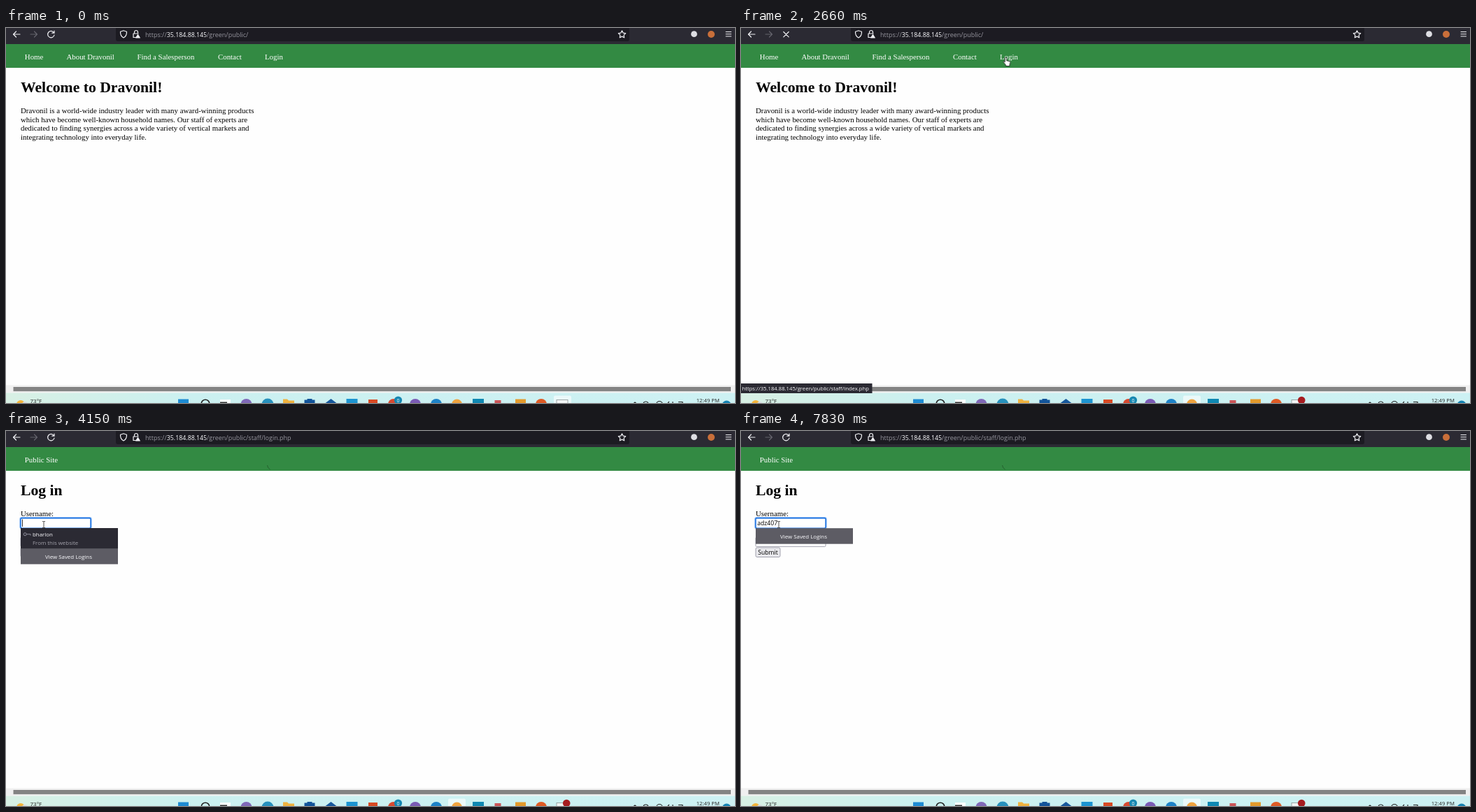
An HTML page that plays this animation: 1042 by 537 pixels, repeating every 8 s.

```html
<!DOCTYPE html>
<html lang="en">
<head>
<meta charset="utf-8">
<title>Login walkthrough</title>
<style>
html, body { margin: 0; width: 100%; height: 100%; overflow: hidden; background: #fff; }
svg { display: block; width: 1042px; height: 537px; }
text { white-space: pre; }
.page { font: 10.85px "Liberation Serif", Times, serif; }
.page .h1 { font-size: 21.7px; font-weight: bold; }
.nav { fill: #fff; }
.ui { font-family: "Open Sans", "Noto Sans", sans-serif; }
.url { font-size: 9px; fill: #96959e; }
.url .host { fill: #fbfbfe; }
.line { fill: none; stroke: #f0f0f4; stroke-width: 1.2; stroke-linecap: round; stroke-linejoin: round; }
.field { fill: #fff; stroke: #8f8f9d; stroke-width: .8; }
.glow { fill: none; stroke: #9cc4f7; stroke-width: 2.6; }
.focus { fill: #fff; stroke: #0a66dd; stroke-width: 1.4; }
.menu { font-size: 7.9px; fill: #fbfbfe; }
.form { font-size: 8.6px; }

/* One 8 s timeline, 1% = 80 ms */
.home, .login, .reload, .stop, .status, .app1, .app2, .rec, .arrow, .hand, .beam,
.pass, .user, .full, .short, .caret, .typed { animation: 8s step-end infinite; }
.home { animation-name: home; }
.login { animation-name: login; }
.reload { animation-name: reload; }
.stop { animation-name: stop; }
.status { animation-name: status; }
.app1 { animation-name: app1; }
.app2 { animation-name: app2; }
.rec { animation-name: rec; }
.arrow { animation-name: arrow; }
.hand { animation-name: hand; }
.beam { animation-name: beam; }
.pass { animation-name: pass; }
.user { animation-name: user; }
.full { animation-name: full; }
.short { animation-name: short; }
.caret { animation-name: type, blink; }
.typed { animation-name: type; }
.pointer { animation: move 8s linear infinite; }

@keyframes home { 0% { visibility: visible } 36.625% { visibility: hidden } }
@keyframes login { 0% { visibility: hidden } 36.625% { visibility: visible } }
@keyframes reload { 0%, 36.625% { visibility: visible } 29% { visibility: hidden } }
@keyframes stop { 0%, 36.625% { visibility: hidden } 29% { visibility: visible } }
@keyframes status { 0%, 36.625% { visibility: hidden } 24% { visibility: visible } }
@keyframes app1 { 0% { visibility: visible } 28.125% { visibility: hidden } }
@keyframes app2 { 0% { visibility: hidden } 28.125% { visibility: visible } }
@keyframes rec { 0% { visibility: hidden } 1.75% { visibility: visible } }
@keyframes arrow { 0%, 21.5%, 49.25% { visibility: hidden } .875%, 40% { visibility: visible } }
@keyframes hand { 0%, 36.625% { visibility: hidden } 21.5% { visibility: visible } }
@keyframes beam { 0% { visibility: hidden } 49.25% { visibility: visible } }
@keyframes pass { 0%, 51% { visibility: hidden } 36.625% { visibility: visible } }
@keyframes user { 0% { visibility: hidden } 51% { visibility: visible } }
@keyframes full { 0%, 74.5% { visibility: hidden } 51.875% { visibility: visible } }
@keyframes short { 0% { visibility: hidden } 74.5% { visibility: visible } }
@keyframes blink {
  0%, 57.875%, 71.125%, 97.875% { visibility: hidden }
  51%, 64.5%, 73.625% { visibility: visible }
}
@keyframes type {
  0% { transform: none }
  73.625% { transform: translateX(.556em) }
  77.75% { transform: translateX(1.169em) }
  81.125% { transform: translateX(1.637em) }
  84.5% { transform: translateX(2.209em) }
  88.625% { transform: translateX(2.781em) }
  91.125% { transform: translateX(3.353em) }
}
@keyframes move {
  0%, .875% { transform: translate(882px, 466px); animation-timing-function: ease-in-out }
  10.25%, 11.1% { transform: translate(367px, 229px); animation-timing-function: ease-in }
  15.5% { transform: translate(325px, 130px); animation-timing-function: ease-out }
  20.6% { transform: translate(369px, 47px) }
  21.5%, 23% { transform: translate(376.5px, 44px) }
  24.9%, 36.6% { transform: translate(378.5px, 42px) }
  36.7%, 40% { transform: translate(140px, 10px) }
  43% { transform: translate(4px, 62px) }
  46% { transform: translate(30px, 167px); animation-timing-function: ease-out }
  49.2%, 100% { transform: translate(54px, 134px) }
}
</style>
</head>
<body>
<svg viewBox="0 0 1042 537">
  <defs>
    <linearGradient id="bar">
      <stop offset="0" stop-color="#d8f0e4"/>
      <stop offset=".25" stop-color="#cbf0f0"/>
      <stop offset="1" stop-color="#cdf1f3"/>
    </linearGradient>
    <clipPath id="reveal"><rect class="typed form" x="-37" y="122" width="60.5" height="20"/></clipPath>
    <g id="more" class="ui menu">
      <rect width="139" height="22.5" fill="#5d5c64"/>
      <text x="68.5" y="14.6" text-anchor="middle">View Saved Logins</text>
    </g>
    <g id="saved" class="ui menu">
      <rect width="139" height="30" fill="#2b2a33"/>
      <g fill="none" stroke="#8f8f9d"><circle cx="6.2" cy="8.8" r="2"/><path d="M8.2 8.8H14v1.8"/></g>
      <text x="17" y="11.6">bharlon</text>
      <text x="17" y="24.2" fill="#a3a2ab">From this website</text>
      <use href="#more" y="29.2"/>
    </g>
  </defs>

  <rect width="1042" height="537" fill="#fefefe"/>

  <!-- Browser toolbar -->
  <rect width="1042" height="23" fill="#2b2a33"/>
  <rect x="157" y="-4" width="734" height="23" rx="3" fill="#1c1b22"/>
  <g class="line">
    <path d="M20 9H10.500M14.500 5l-4 4 4 4"/>
    <path d="M35 9h9.500M40.500 5l4 4-4 4" stroke="#65646d"/>
    <path class="reload" d="M68.300 6.500A4.700 4.700 0 1 0 69 10M69 4v3.200h-3.200"/>
    <path class="stop" d="M60.800 5.500l7.400 7.400M68.200 5.500l-7.400 7.400"/>
    <path d="M168 3.800l4.500 1.500c.2 4-1 7-4.500 8.700-3.500-1.700-4.700-4.700-4.500-8.700z"/>
    <path d="M183.500 8V6a2.500 2.500 0 0 1 5 0v2M186 13.500h-4V8h7"/>
    <path d="M188.500 9.500l2.800 4.500h-5.600z" fill="#f0f0f4"/>
    <path d="M880.500 3.800l1.600 3.300 3.600.5-2.600 2.600.6 3.600-3.200-1.700-3.200 1.700.6-3.600-2.600-2.600 3.600-.5z"/>
    <path d="M1029 5.500h7.500M1029 8.700h7.500M1029 11.900h7.500" stroke-width="1"/>
  </g>
  <circle cx="983.500" cy="8.700" r="4.400" fill="#dedee3"/>
  <circle cx="1008" cy="9" r="5" fill="#c96f3a"/>
  <g class="ui url">
    <text x="199" y="12.800">https://</text>
    <text x="229.800" y="12.800" class="host" font-size="8.800">35.184.88.145</text>
    <text x="287" y="12.800" class="home">/green/public/</text>
    <text x="287" y="12.800" class="login">/green/public/staff/login.php</text>
  </g>

  <!-- Web pages -->
  <rect y="23" width="1042" height="34" fill="#338a43"/>
  <g class="page home">
    <g class="nav">
      <text x="26.800" y="45">Home</text>
      <text x="86.500" y="45">About Dravonil</text>
      <text x="187.500" y="45">Find a Salesperson</text>
      <text x="303" y="45">Contact</text>
      <text x="370" y="45">Login</text>
    </g>
    <text class="h1" x="21" y="92">Welcome to Dravonil!</text>
    <text x="21" y="122">Dravonil is a world-wide industry leader with many award-winning products</text>
    <text x="21" y="134.600">which have become well-known household names. Our staff of experts are</text>
    <text x="21" y="147.200">dedicated to finding synergies across a wide variety of vertical markets and</text>
    <text x="21" y="159.800">integrating technology into everyday life.</text>
  </g>
  <g class="page login">
    <text class="nav" x="26.800" y="45">Public Site</text>
    <path d="M373.500 49q.3 4 4 6" fill="none" stroke="#22552b" stroke-width=".8"/>
    <text class="h1" x="21" y="92">Log in</text>
    <text x="21" y="122">Username:</text>
    <rect class="field" x="21" y="125" width="100" height="13.600" rx="1.500"/>
    <text x="21" y="149.300">Password:</text>
    <rect class="field" x="21" y="152" width="100" height="13.600" rx="1.500"/>
    <rect x="21" y="167" width="35" height="13.500" rx="2" fill="#e9e9ed" stroke="#8f8f9d" stroke-width=".8"/>
    <text class="ui form" x="24.300" y="177">Submit</text>
  </g>
  <g class="pass">
    <rect class="glow" x="20.500" y="151" width="101" height="15" rx="2"/>
    <rect class="focus" x="21" y="151.500" width="100" height="14.300" rx="1.500"/>
    <use href="#saved" x="21" y="165.500"/>
  </g>
  <g class="user">
    <rect class="glow" x="20.500" y="124.300" width="101" height="15" rx="2"/>
    <rect class="focus" x="21" y="124.800" width="100" height="14.300" rx="1.500"/>
  </g>
  <use class="full" href="#saved" x="21" y="139"/>
  <use class="short" href="#more" x="21" y="139.200"/>
  <g clip-path="url(#reveal)"><text class="ui form" x="23.300" y="135.300">adz407</text></g>
  <rect class="caret form" x="23.200" y="126.500" width=".8" height="10.500"/>

  <!-- Scrollbar and taskbar -->
  <rect y="511.500" width="1042" height="11" fill="#f0f0f0"/>
  <rect x="10.500" y="514" width="1025.500" height="6.200" fill="#838383"/>
  <rect y="522.500" width="1042" height="15" fill="url(#bar)"/>
  <rect class="app1" x="783" y="526.500" width="25" height="14" rx="2" fill="#fff" opacity=".6"/>
  <rect class="app2" x="632" y="526.500" width="25" height="14" rx="2" fill="#fff" opacity=".6"/>
  <circle cx="21" cy="539" r="6" fill="#f3b43a"/>
  <circle cx="27" cy="539" r="4" fill="#d9dde2"/>
  <rect x="246" y="531.500" width="15" height="9" fill="#1d8bd3"/>
  <circle cx="285" cy="538" r="5.800" fill="none" stroke="#222" stroke-width="1.600"/>
  <path d="M306 532h15v6h-15z" fill="#fbfdfd"/>
  <path d="M306 535.500h10v3h-10z" fill="#333"/>
  <circle cx="343.500" cy="539" r="8" fill="#8069b8"/>
  <circle cx="374" cy="539" r="8.500" fill="#2791bd"/>
  <path d="M396 538v-6.500h6l2 2h8v4.500z" fill="#efb23f"/>
  <path d="M426.500 538v-5.500h4v-1.500h7v1.500h4v5.500z" fill="#12549a"/>
  <path d="M456 537.500l8.500-6.500 8.500 6.500z" fill="#17589c"/>
  <rect x="486.500" y="531" width="16" height="8" fill="#1c94d1"/>
  <rect x="518" y="532" width="13" height="8" fill="#d84a24"/>
  <circle cx="554" cy="539" r="8" fill="#d74a31"/>
  <circle cx="560.500" cy="533" r="5.600" fill="#1687b1"/>
  <text class="ui" x="560.500" y="535.600" font-size="7" fill="#fff" text-anchor="middle">0</text>
  <circle cx="585" cy="539" r="8" fill="#7b5bb5"/>
  <circle cx="615" cy="539" r="8" fill="#1d82c7"/>
  <circle cx="644.500" cy="539" r="7.500" fill="#efa33f"/>
  <rect x="667" y="531" width="16" height="8" fill="#0f88b2"/>
  <rect x="698.500" y="533" width="9" height="6" fill="#cb5558"/>
  <rect x="728" y="531.500" width="15" height="8" fill="#e39a2c"/>
  <circle cx="765" cy="539" r="8" fill="#de5b25"/>
  <rect x="787" y="532.500" width="16" height="8" fill="#f2f5f5" stroke="#8c9494" stroke-width=".8"/>
  <circle class="rec" cx="801.200" cy="533" r="5.300" fill="#a61c20"/>
  <g fill="none" stroke="#222" stroke-width="1.100">
    <path d="M897 537.500l2-1.500 2 1.500M948 535l-2 2M953 535v2M961 535.500h6v2"/>
    <circle cx="914.500" cy="538.500" r="3.500"/>
    <circle cx="934" cy="539" r="4.500"/>
  </g>
  <circle cx="1030" cy="540" r="6.500" fill="#1583b3"/>
  <g class="ui" fill="#222">
    <text x="34.500" y="537" font-size="8">73°F</text>
    <text x="986.700" y="536.300" font-size="7.700">12:49 PM</text>
  </g>
  <g class="status">
    <rect y="509" width="187.500" height="14" fill="#2b2a33"/>
    <text class="ui" x="1.500" y="519.200" font-size="7.700" fill="#fbfbfe">https://35.184.88.145/green/public/staff/index.php</text>
  </g>

  <!-- Pointer shapes share one moving origin -->
  <g class="pointer">
    <path class="arrow" d="M0 0v11.500l2.700-2.500 1.800 4 1.700-.8-1.800-3.900h3.700z" fill="#fff" stroke="#111" stroke-width=".7"/>
    <path class="hand" d="M-1.200 1.200a1.200 1.200 0 0 1 2.400 0v3.600l4 .8q1.300.4 1.100 2l-.8 3.400v1.500h-5.500v-1.500l-3.200-4q-.6-1.700 1-1.200l1 1z" fill="#fff" stroke="#111" stroke-width=".8"/>
    <path class="beam" d="M-2-4.500h1.500l.5.500.5-.5H2M0-4v8M-2 4.500h1.500L0 4l.5.500H2" fill="none" stroke="#222" stroke-width=".8"/>
  </g>
</svg>
</body>
</html>
```
